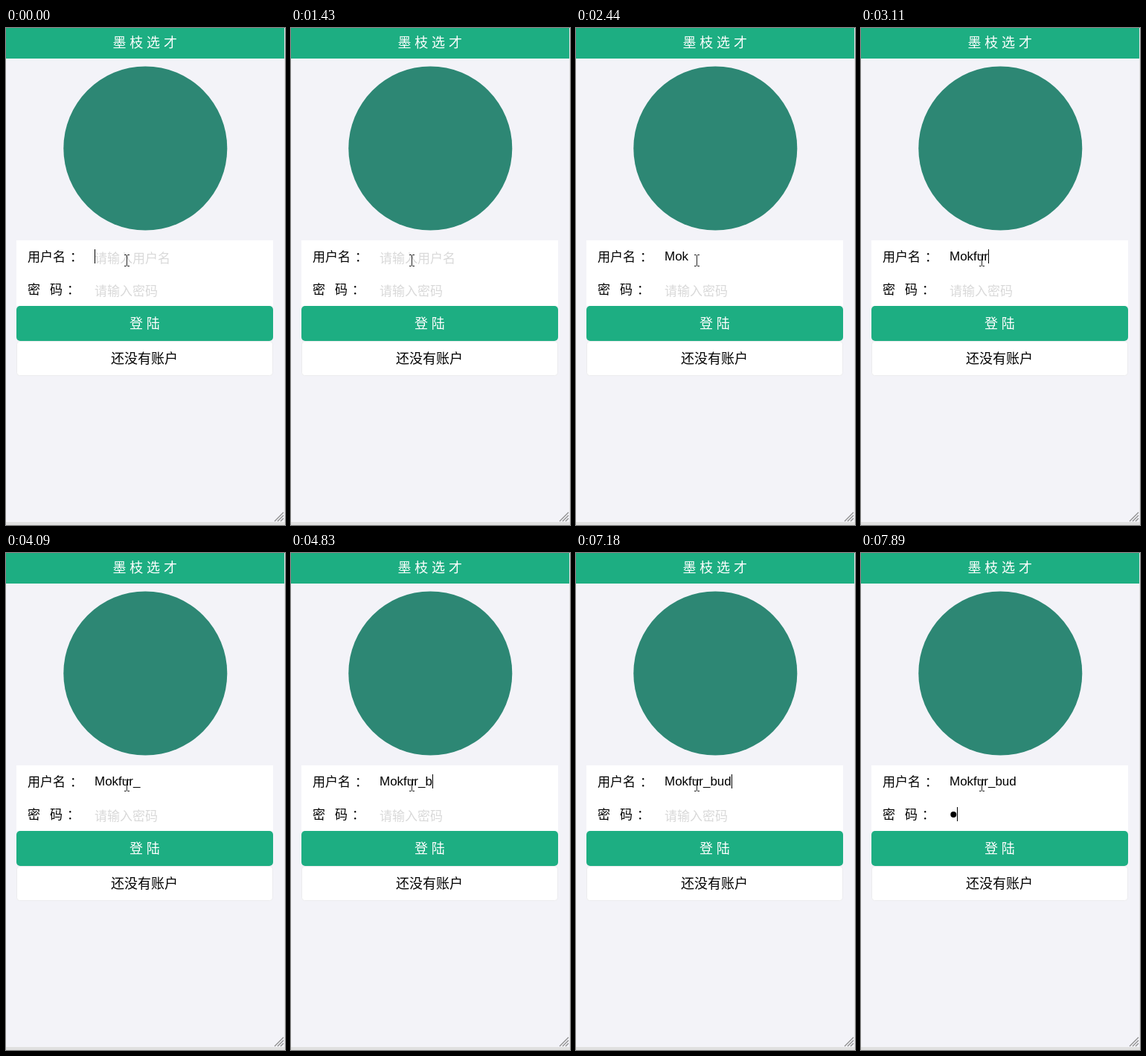
Write an HTML page that moves like this. It is 375 by 667 pixels and loops after 8 s.

```html
<!DOCTYPE html>
<html lang="zh-CN">
<head>
<meta charset="utf-8">
<title>登陆</title>
<style>
  html, body { margin: 0; width: 100%; height: 100%; overflow: hidden; background: #f3f3f8; }
  svg { display: block; }
  text { font: 17px "Noto Sans CJK SC", "Noto Sans CJK", sans-serif; }
  .large { font-size: 18px; }
  .spaced { font-size: 18px; letter-spacing: 4.8px; fill: #fff; }
  .hint { fill: #d9d9d9; }
  #user { font-family: "Liberation Sans", Arial, sans-serif; }
</style>
</head>
<body>
<svg width="375" height="667" viewBox="0 0 375 667">
  <rect width="375" height="667" fill="#f3f3f8"/>
  <rect width="374" height="41" fill="#1dae82"/>
  <text class="spaced" x="143.5" y="26">墨枝选才</text>

  <circle cx="187.3" cy="161.5" r="110" fill="#2d8774"/>

  <rect x="14" y="285" width="345" height="88" fill="#fff"/>
  <text x="29" y="312.5">用户名</text><text x="86" y="312.5">：</text>
  <text x="29" y="356.5">密</text><text x="59" y="356.5">码</text><text x="82" y="356.5">：</text>
  <text class="hint" id="userHint" x="119" y="314.5">请输入用户名</text>
  <text class="hint" id="passHint" x="119" y="358.5">请输入密码</text>
  <text id="user" x="119" y="312"></text>
  <circle id="dot" cx="124.3" cy="351" r="4"/>

  <rect x="14" y="373" width="345" height="47" rx="5" fill="#1dae82"/>
  <text class="spaced" x="166" y="402.5">登陆</text>
  <rect x="14.5" y="420.5" width="344" height="46" rx="4" fill="#fff" stroke="#ececee"/>
  <text class="large" x="141" y="449.5">还没有账户</text>

  <rect id="caret" width="1" height="19"/>
  <path d="M159 304.5h2.5l1 1 1-1h2.5M162.5 305v14M159 319.5h2.5l1-1 1 1h2.5" fill="none" stroke="#222"/>

  <rect x="374" width="1" height="667" fill="#e4e4e6"/>
  <rect y="663" width="375" height="4" fill="#e0e0e0"/>
  <path d="M361 662l12-12M365 662l8-8M369 662l4-4" stroke="#8c8c8c" stroke-width="1.2"/>
</svg>
<script>
  const LOOP = 8000, FIELD_X = 119, DOT_WIDTH = 10, NAME = "Mokfur_bud";

  // The screen refreshes in steps; key presses and blinking are counted in them.
  const FIRST_STEP = 294, STEP = 140.2, BLINK = 3.72;
  const keySteps = [9, 11, 15, 17, 18, 20, 26, 32, 36, 37];
  const PASS_FOCUS = 51, PASS_TYPED = 54;

  const el = id => document.getElementById(id);
  const [user, userHint, passHint, dot, caret] =
    ["user", "userHint", "passHint", "dot", "caret"].map(el);
  const show = (node, visible) =>
    node.setAttribute("visibility", visible ? "visible" : "hidden");
  const blinks = step => Math.floor(step / BLINK);

  // A key press turns the caret on; every blink after it toggles the caret.
  function caretOn(step, lastKey) {
    return (blinks(step) - blinks(lastKey - 0.5)) % 2 === 0;
  }

  function draw(t) {
    const step = Math.floor((t - FIRST_STEP) / STEP);
    const pressed = keySteps.filter(key => key <= step);
    const inPassword = step >= PASS_FOCUS, passTyped = step >= PASS_TYPED;

    user.textContent = NAME.slice(0, pressed.length);
    show(userHint, !pressed.length);
    show(passHint, !passTyped);
    show(dot, passTyped);
    show(caret, inPassword || caretOn(step, pressed.at(-1) ?? 0));

    const nameWidth = pressed.length ? user.getComputedTextLength() : 0;
    const typedWidth = inPassword ? passTyped * DOT_WIDTH : nameWidth;
    caret.setAttribute("x", Math.round(FIELD_X + typedWidth));
    caret.setAttribute("y", inPassword ? 341 : 297);
  }

  const begin = performance.now();
  function tick() {
    draw((performance.now() - begin) % LOOP);
    requestAnimationFrame(tick);
  }
  tick();
</script>
</body>
</html>
```
